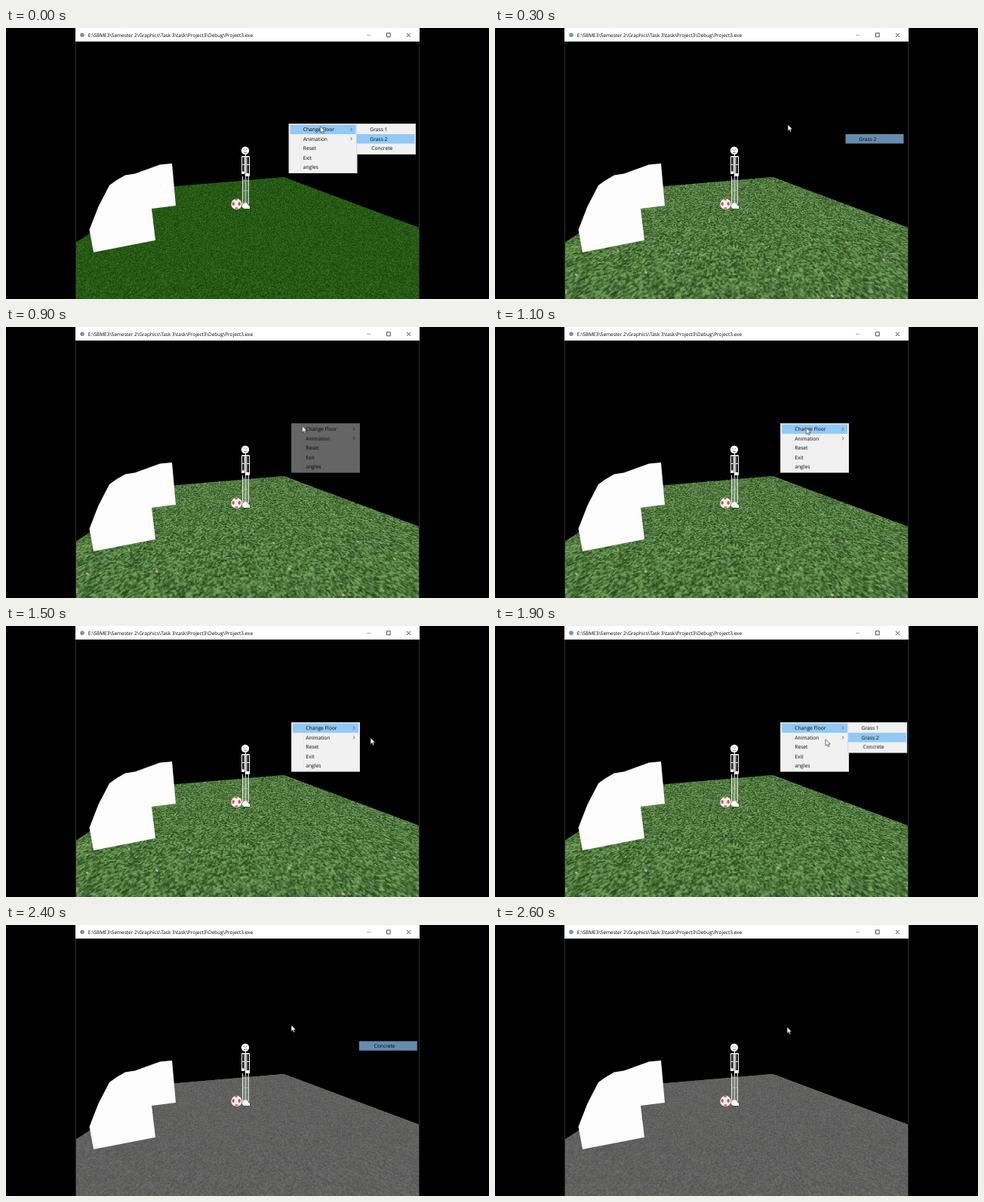
Write an HTML page with a canvas that moves like this. It is 640 px wide and 360 px high and loops after 2800 ms.

```html
<!DOCTYPE html>
<html lang="en">
<head>
<meta charset="utf-8">
<title>Floor menu</title>
<style>
  html, body { margin: 0; width: 100%; height: 100%; overflow: hidden; background: #000; }
  #stage { position: relative; width: 640px; height: 360px; overflow: hidden; background: #000; }
  canvas, svg { position: absolute; left: 0; top: 0; }
  canvas { clip-path: polygon(92.5px 285px, 205px 212px, 368px 198px, 547px 265px, 547px 360px, 92.5px 360px); }
  text { font: 6.7px "Open Sans", "Noto Sans", sans-serif; text-rendering: geometricPrecision; }
  #title { font-size: 6.49px; }

  /* One loop is 28 ticks of 100 ms: a tick is 3.5714% */
  .loop { animation: 2.8s step-end infinite; }
  #grass2 { animation-name: grass2; }
  #concrete { animation-name: concrete; }
  #menuA { animation-name: menuA; }
  #pickA { animation-name: pickA; }
  #menuB { animation-name: menuB; }
  #rowB { animation-name: rowB; }
  #subB { animation-name: subB; }
  #hotB { animation-name: hotB; }
  #pickB { animation-name: pickB; }
  #cursor { animation: cursor 2.8s infinite; }

  @keyframes grass2 { 0% { opacity: 0 } 10.714% { opacity: 1 } }
  @keyframes concrete { 0% { opacity: 0 } 85.714% { opacity: 1 } }
  @keyframes menuA { 0% { opacity: 1 } 10.714% { opacity: 0 } }
  @keyframes pickA { 0% { opacity: 0 } 10.714% { opacity: .7 } 14.285% { opacity: .3 } 17.857% { opacity: 0 } }
  @keyframes menuB { 0% { opacity: 0 } 32.142% { opacity: .42 } 35.714% { opacity: 1 } 85.714% { opacity: 0 } }
  @keyframes rowB { 0% { opacity: 0 } 35.714% { opacity: 1 } }
  @keyframes subB { 0% { opacity: 0 } 57.142% { opacity: .5 } 60.714% { opacity: 1 } 85.714% { opacity: 0 } }
  @keyframes hotB {
    0% { transform: translateY(-12.5px); opacity: 0 }
    60.714% { transform: translateY(-12.5px); opacity: 1 }
    64.285% { transform: translateY(0); opacity: 1 }
    75% { transform: translateY(12.5px); opacity: 1 }
  }
  @keyframes pickB { 0% { opacity: 0 } 85.714% { opacity: .7 } 89.285% { opacity: .3 } 92.857% { opacity: 0 } }
  @keyframes cursor {
    0% { transform: translate(416.5px, 130.5px); animation-timing-function: steps(4) }
    14.285% { transform: translate(378.5px, 127.5px); animation-timing-function: step-end }
    32.142% { transform: translate(392.5px, 131.5px); animation-timing-function: steps(4) }
    46.428% { transform: translate(432px, 136px); animation-timing-function: steps(2) }
    53.571% { transform: translate(483px, 148.5px); animation-timing-function: steps(4) }
    67.857% { transform: translate(438px, 150.5px); animation-timing-function: steps(2) }
    75% { transform: translate(480px, 158px); animation-timing-function: steps(2) }
    82.142% { transform: translate(373.5px, 131.5px); animation-timing-function: steps(3) }
    92.857%, 100% { transform: translate(387px, 135.5px); animation-timing-function: step-end }
  }
</style>
</head>
<body>
<div id="stage">
  <canvas id="grass1" width="640" height="360"></canvas>
  <canvas id="grass2" class="loop" width="640" height="360"></canvas>
  <canvas id="concrete" class="loop" width="640" height="360"></canvas>

  <svg width="640" height="360" viewBox="0 0 640 360">
    <defs>
      <g id="menu">
        <rect width="91" height="66" fill="#dcdcdc"/>
        <rect x="1" y="1" width="89" height="64" fill="#f1f1f1"/>
        <path d="M16.5 2V64" stroke="#e4e4e4" stroke-width=".6"/>
      </g>
      <g id="labels">
        <text x="19.3" y="10.1">Change Floor</text>
        <text x="19.3" y="22.6">Animation</text>
        <text x="19.3" y="35.1">Reset</text>
        <text x="19.3" y="47.6">Exit</text>
        <text x="19.3" y="60.1">angles</text>
        <path d="M82 5.7l1.9 2-1.9 2M82 18.2l1.9 2-1.9 2" fill="none" stroke="#444" stroke-width=".8"/>
      </g>
      <rect id="row" x="2" y="1.5" width="87" height="12.5" fill="#91c9f7"/>
      <g id="sub">
        <rect width="79" height="41" fill="#dcdcdc"/>
        <rect x="1" y="1" width="77" height="39" fill="#f1f1f1"/>
      </g>
      <rect id="hot" x=".5" y="14" width="77" height="12.5" fill="#91c9f7"/>
      <g id="items">
        <text x="18.3" y="10.1">Grass 1</text>
        <text x="18.3" y="22.6">Grass 2</text>
        <text x="20.3" y="35.1">Concrete</text>
      </g>
    </defs>

    <path d="M92.5 18V360M547.5 18V360" stroke="#2c2c2c"/>
    <rect x="92" width="456" height="18" fill="#fff"/>
    <circle cx="101" cy="9.3" r="2.8" fill="#7d93a5"/>
    <text id="title" x="108.8" y="11.7">E:\SBME3\Semester 2\Graphics\Task 3\task\Project3\Debug\Project3.exe</text>
    <path d="M478 9.5h5" stroke="#999" stroke-width=".8"/>
    <path d="M504.5 6.8h4.7v5h-4.7zM531 7l5 5M536 7l-5 5" fill="none" stroke="#222" stroke-width=".8"/>

    <path d="M110.5 268L122.5 237L137 209L146 202.5L158 195.5L171 193.5L204 181.5L220 180L225 236L193 240L198 282L116 298Z" fill="#fdfdfd"/>

    <g id="player" fill="none" stroke="#fff">
      <path d="M313.5 197V234M321.5 197V234M317.4 197V234" stroke-width=".9"/>
      <path d="M315.3 200V233M319.4 200V233M313.5 203h8M313.5 216h8" stroke="#c0c8c0" stroke-width=".7"/>
      <path d="M312.5 170.5h10M312.6 171v22h3.3v-22zM319 171v25h3.4v-25zM312.5 181.5h3.5M319 181.5h3.5M317.4 168v29" stroke-width="1.1"/>
      <path d="M312 190.5h4v3.5h-4zM317.5 193h5v4h-5zM313 235l2.5-2.5h4l1.5 2.5 2 2v3h-7.5l-2.5-2z" fill="#fff" stroke="none"/>
      <circle cx="317" cy="162.8" r="5.2" fill="#fff" stroke="none"/>
      <path d="M314.7 161.6h1.2M318 161.6h1.2M315 165q2 1.3 4 0M317 162.5v1.2" stroke="#555" stroke-width=".8"/>
    </g>

    <g id="ball">
      <circle cx="305.5" cy="234" r="7.2" fill="#f7f3f2"/>
      <g fill="#d5505c">
        <ellipse cx="301.2" cy="233.6" rx="1.7" ry="2.5"/>
        <ellipse cx="309.2" cy="233.4" rx="1.8" ry="2.5"/>
        <ellipse cx="305" cy="228" rx="2" ry=".9"/>
        <ellipse cx="305.4" cy="239.4" rx="2.2" ry="1.2"/>
      </g>
    </g>

    <g id="menuA" class="loop">
      <g transform="translate(374.5 127)">
        <use href="#menu"/><use href="#row"/><use href="#labels"/>
      </g>
      <g transform="translate(464 127)">
        <use href="#sub"/><use href="#hot"/><use href="#items"/>
      </g>
    </g>
    <g id="pickA" class="loop" transform="translate(464 127)">
      <use href="#hot"/><text x="18.3" y="22.6">Grass 2</text>
    </g>

    <g transform="translate(378 127.8)">
      <g id="menuB" class="loop">
        <use href="#menu"/>
        <g id="rowB" class="loop"><use href="#row"/></g>
        <use href="#labels"/>
      </g>
    </g>
    <g transform="translate(467.3 127.8)">
      <g id="subB" class="loop">
        <use href="#sub"/>
        <g id="hotB" class="loop"><use href="#hot"/></g>
        <use href="#items"/>
      </g>
      <g id="pickB" class="loop">
        <use href="#hot" y="12.5"/><text x="20.3" y="35.1">Concrete</text>
      </g>
    </g>

    <g id="cursor">
      <path d="M0 0V8.6L2 6.8L3.4 9.8L4.8 9.2L3.5 6.3H6.2Z" fill="#fff" stroke="#111" stroke-width=".6"/>
    </g>
  </svg>
</div>

<script>
  const hash = (x, y) => {
    let h = Math.imul(x, 374761393) ^ Math.imul(y, 668265263);
    h = Math.imul(h ^ (h >>> 13), 1274126177);
    return ((h ^ (h >>> 16)) >>> 0) / 4294967296;
  };
  const mix = (a, b, t) => a + (b - a) * t;

  function noise(x, y) {
    const i = Math.floor(x), j = Math.floor(y), u = x - i, v = y - j;
    return mix(mix(hash(i, j), hash(i + 1, j), u), mix(hash(i, j + 1), hash(i + 1, j + 1), u), v);
  }

  // Perspective noise: cells shrink towards the horizon
  function paint(id, low, high, cell, grain) {
    const ctx = document.getElementById(id).getContext('2d');
    const img = ctx.createImageData(640, 360);
    for (let y = 195; y < 360; y++) {
      const w = y - 110;
      for (let x = 92; x < 548; x++) {
        const soft = noise((x - 320) * 250 / w / cell + 900, 62500 / w / cell);
        const t = mix(soft, hash(x, y), grain);
        const p = (y * 640 + x) * 4;
        for (let c = 0; c < 3; c++) img.data[p + c] = mix(low[c], high[c], t);
        img.data[p + 3] = 255;
      }
    }
    ctx.putImageData(img, 0, 0);
    return ctx;
  }

  paint('grass1', [12, 56, 4], [64, 122, 36], 1.6, .5);
  const grass = paint('grass2', [20, 50, 12], [140, 190, 112], 2.8, .25);
  paint('concrete', [76, 76, 76], [116, 116, 115], 2, .4);

  // Pale stones in the second grass
  grass.fillStyle = '#b9aaa4';
  for (const [x, y] of [[515, 308], [375, 321], [447, 356], [243, 300], [108, 328], [355, 287], [200, 325], [466, 285], [163, 296]]) {
    grass.beginPath();
    grass.ellipse(x, y, (y - 110) / 105, (y - 110) / 150, .5, 0, 7);
    grass.fill();
  }
</script>
</body>
</html>
```
